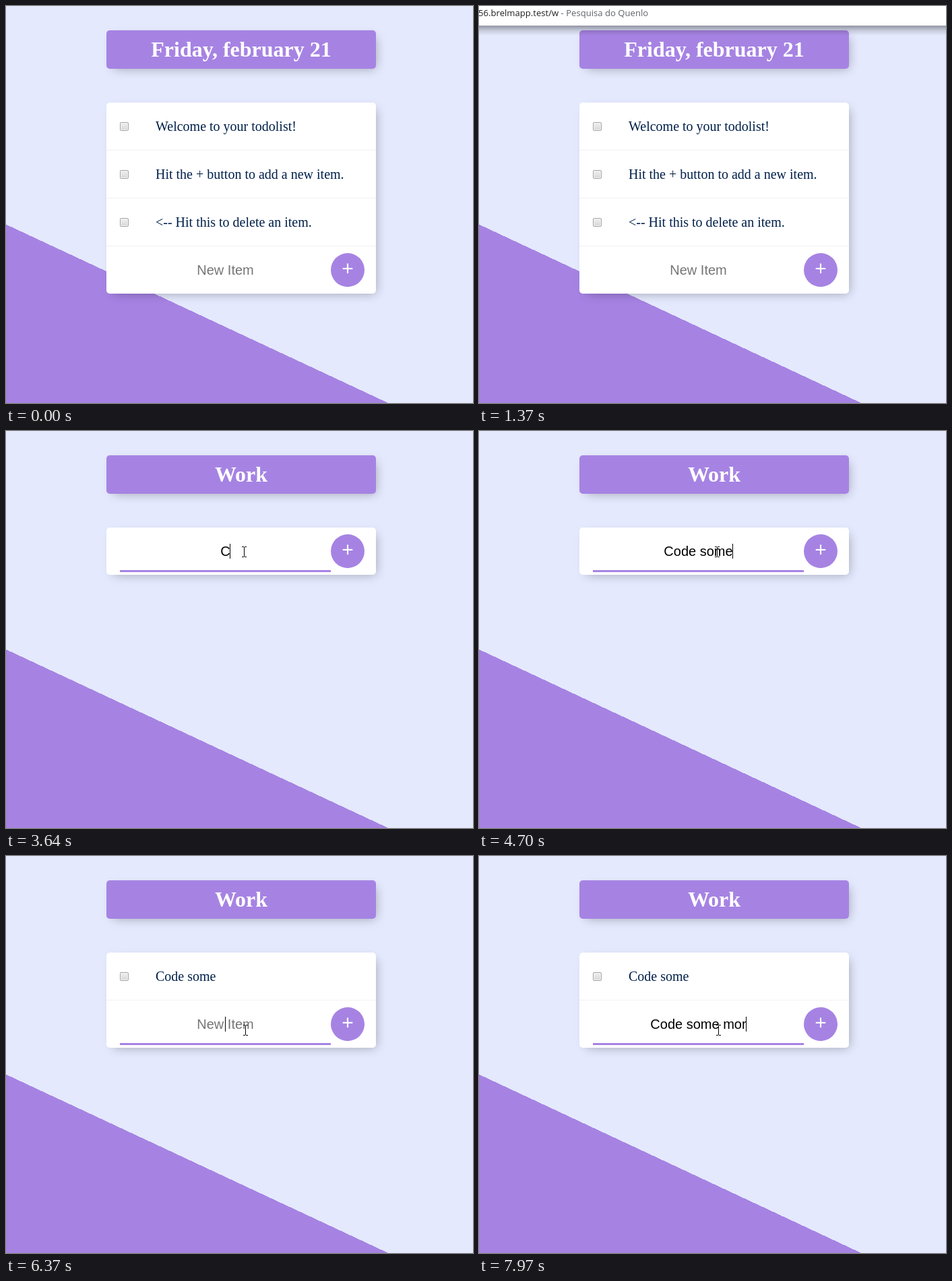
These frames come from a looping animation (693 px wide and 588 px high, 8000 ms). An HTML page:

```html
<!DOCTYPE html>
<html lang="en">
<head>
<meta charset="utf-8">
<title>Todolist</title>
<style>
  html, body { margin: 0; width: 100%; height: 100%; overflow: hidden; background: #e4e9fd; }
  svg { display: block; width: 693px; height: 588px; overflow: hidden; }
  text { white-space: pre; }
  .title { font: bold 32px "Liberation Serif", "Times New Roman", serif; fill: #fff; }
  .item { font: 20px "Liberation Serif", "Times New Roman", serif; fill: #00204a; }
  .field { font: 20px "Liberation Sans", Arial, sans-serif; }
  .plus { font: 30px "Liberation Sans", Arial, sans-serif; fill: #fff; }
  .mid { text-anchor: middle; }
  .end { text-anchor: end; }
  .shadow { fill: #000; fill-opacity: .3; filter: blur(7.5px); }
  .url { font: 13.1px "Open Sans", "Noto Sans", sans-serif; fill: #2b5fc3; }
  .url .b { font-weight: 700; font-size: 13px; }
  .url .dark { fill: #202124; }
  .url .grey { fill: #5f6368; }
  .crisp { shape-rendering: crispEdges; }
</style>
</head>
<body>
<svg viewBox="0 0 693 588">
  <defs>
    <linearGradient id="drop" x2="0" y2="1">
      <stop offset="0" stop-opacity=".36"/>
      <stop offset=".5" stop-opacity=".13"/>
      <stop offset="1" stop-opacity="0"/>
    </linearGradient>
    <linearGradient id="check" x2="0" y2="1">
      <stop offset="0" stop-color="#eee"/>
      <stop offset="1" stop-color="#d9d9d9"/>
    </linearGradient>
  </defs>

  <rect width="693" height="588" fill="#e4e9fd"/>
  <path class="crisp" d="M0 323.5L567.3 588H0z" fill="#a683e3"/>

  <rect class="shadow" x="159" y="46" width="390" height="47" rx="5"/>
  <rect x="149" y="36" width="400" height="57" rx="5" fill="#a683e3"/>
  <text id="title" class="title mid" x="349" y="75"></text>

  <rect id="cardShadow" class="shadow" x="159" y="153" width="390" rx="5"/>
  <rect id="card" x="149" y="143" width="400" rx="5" fill="#fff"/>
  <g id="items"></g>

  <g id="row">
    <text id="field" class="field mid" x="325.5" y="42"></text>
    <rect id="caret" class="crisp" y="24" width="1" height="22"/>
    <rect id="line" class="crisp" x="169" y="63" width="313" height="3" fill="#a683e3"/>
    <circle cx="507" cy="35" r="25" fill="#a683e3"/>
    <text class="plus mid" x="507" y="43">+</text>
  </g>

  <g id="menu" class="url">
    <rect id="menuShade" width="693" height="15" fill="url(#drop)"/>
    <rect id="menuBox" width="693" fill="#fff"/>
    <text class="dark end" x="108" y="15">hidden-meadow-41756.brelmapp.test/</text>
    <text x="108" y="15"><tspan id="path" class="dark"></tspan><tspan class="grey"> - Pesquisa do Quenlo</tspan></text>
    <g id="hints"></g>
  </g>

  <g id="arrow"><path d="M.5.5v16l3.7-3.4 2.4 5.5 2.2-.9-2.4-5.5h5z" fill="#fff" stroke="#000"/></g>
  <g id="beam"><path class="crisp" d="M-3.5-7.5h3M.5-7.5h3M0-7v14M-3.5 7.5h3M.5 7.5h3" fill="none" stroke="#000"/></g>
</svg>

<script>
const LOOP = 8000, STEP = 200 / 3;
const $ = id => document.getElementById(id);
const show = (id, on) => $(id).style.display = on ? '' : 'none';
const set = (id, name, value) => $(id).setAttribute(name, value);
const move = (id, x, y) => set(id, 'transform', `translate(${x} ${y})`);

const HOST = 'hidden-meadow-41756.brelmapp.test';
const WELCOME = ['Welcome to your todolist!', 'Hit the + button to add a new item.', '<-- Hit this to delete an item.'];

// [time, x, y] of the pointer
const POINTER = [
  [2500, 420, 9], [2633, 396, 70], [2833, 361, 155], [2966, 353, 179],
  [4700, 353, 179], [4766, 402, 169], [4833, 470, 172], [4900, 520, 187],
  [5100, 520, 187], [5500, 440, 206], [5900, 336, 224], [6033, 344, 240], [6166, 355, 258]
];

// [start, end, first length, last length]
const TYPING = [
  [3640, 4370, 1, 9], [6970, 6970, 1, 1], [7170, 7300, 2, 4], [7440, 7970, 5, 13]
];

function buildHints() {
  const rows = ['work', 'trabalho', 'home'].map((word, i) => {
    const y = 53 + 38 * i;
    return `<text class="b end" x="204" y="${y}">${HOST}/</text><text x="204" y="${y}">${word}</text>`;
  });
  const parts = [
    [71, 'https', 'b'], [105, '://', ''], [119, HOST, 'b'],
    [363, '/&amp;sa=D&amp;source=voxtulip&amp;ust=1582303491384000&amp;', '']
  ];
  const long = parts.map(([x, s, c]) => `<text class="${c}" x="${x}" y="167">${s}</text>`).join('');
  $('hints').innerHTML = rows.join('') +
    '<text class="b end" x="24" y="167">com</text><text x="24" y="167">/url?q=</text>' + long;
}

function itemMarkup(text, i) {
  const y = 143 + 71 * i;
  return `<rect x="169.5" y="${y + 29.5}" width="12" height="12" rx="1.5" fill="#f4f4f4" stroke="#a3a3a3"/>
    <rect x="171" y="${y + 31}" width="9" height="9" fill="url(#check)"/>
    <text class="item" x="222" y="${y + 42}">${text.replace('<', '&lt;')}</text>
    <rect class="crisp" x="149" y="${y + 70}" width="400" height="1" fill="#f1f1f1"/>`;
}

let shownList = null;
function drawCard(list) {
  const key = list.join();
  if (key === shownList) return;
  shownList = key;
  const h = list.length * 71 + 70;
  set('card', 'height', h);
  set('cardShadow', 'height', h - 10);
  $('items').innerHTML = list.map(itemMarkup).join('');
  move('row', 0, 143 + list.length * 71);
}

function typedLength(t) {
  const run = TYPING.filter(r => t >= r[0]).pop();
  if (!run) return 0;
  const [start, end, a, b] = run;
  if (a === b) return a;
  return Math.min(b, a + Math.floor((t - start) * (b - a) / (end - start) + 1e-6));
}

function drawField(t) {
  const full = t < 5100 ? 'Code some' : 'Code some more';
  const n = t >= 5100 && t < 6970 ? 0 : typedLength(t);
  const focus = t >= 3100 && t < 5100 || t >= 6370;
  const field = $('field');
  field.textContent = n ? full.slice(0, n) : 'New Item';
  set('field', 'fill', n ? '#000' : '#757575');
  const width = n ? field.getComputedTextLength() : 0;
  set('caret', 'x', Math.floor(325.5 + width / 2));
  show('caret', focus && !(t >= 6900 && t < 6970));
  show('line', focus);
}

function drawMenu(t) {
  const open = t >= 500 && t < 1840;
  show('menu', open);
  if (!open) return;
  const full = t < 1370;
  const h = full ? 181 : 29;
  const n = full ? 0 : Math.min(4, 1 + Math.floor((t - 1370) / STEP + .01));
  set('menuBox', 'height', h);
  set('menuShade', 'y', h);
  show('hints', full);
  $('path').textContent = 'work'.slice(0, n);
}

function drawPointer(t, rowY) {
  // the pointer is sampled 15 times a second
  const q = Math.floor((t - 30) / STEP) * STEP + STEP / 2;
  const i = POINTER.findIndex(p => p[0] > q);
  let [, x, y] = POINTER[POINTER.length - 1];
  if (i === 0) [, x, y] = POINTER[0];
  if (i > 0) {
    const a = POINTER[i - 1], b = POINTER[i];
    const k = (q - a[0]) / (b[0] - a[0]);
    x = Math.round(a[1] + (b[1] - a[1]) * k);
    y = Math.round(a[2] + (b[2] - a[2]) * k);
  }
  const visible = t >= 2500;
  const inField = x > 169 && x < 482 && y >= rowY + 5 && y < rowY + 66;
  show('beam', visible && inField);
  show('arrow', visible && !inField);
  move('beam', x + .5, y);
  move('arrow', x, y);
}

function draw(t) {
  const list = t < 2300 ? WELCOME : t < 5100 ? [] : ['Code some'];
  $('title').textContent = t < 2300 ? 'Friday, february 21' : 'Work';
  drawCard(list);
  drawField(t);
  drawMenu(t);
  drawPointer(t, 143 + list.length * 71);
}

buildHints();
const begin = performance.now();
function tick() {
  draw((performance.now() - begin) % LOOP);
  requestAnimationFrame(tick);
}
tick();
</script>
</body>
</html>
```
